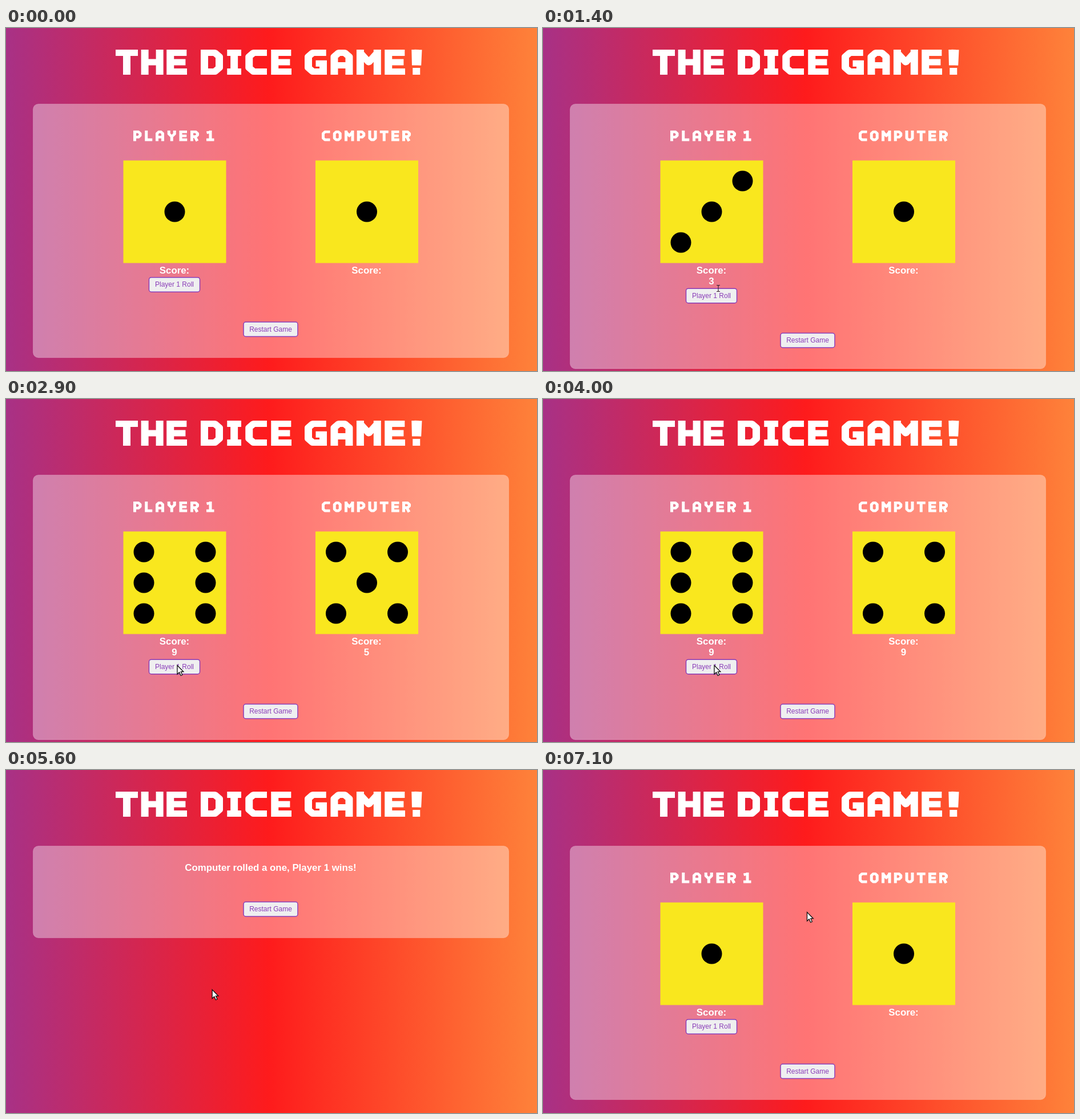
Recreate the animation shown at these times as an HTML page with a canvas. Size 930 by 602 pixels, loop 7.2 s.

```html
<!DOCTYPE html>
<html lang="en">
<head>
<meta charset="utf-8">
<title>The Dice Game</title>
<style>
  html, body { margin: 0; width: 100%; height: 100%; overflow: hidden; background: #fd1d1d; }
  canvas { display: block; }
</style>
</head>
<body>
<canvas id="stage" width="930" height="602" role="img" aria-label="The Dice Game! Player 1 against Computer"></canvas>
<script>
const ctx = document.getElementById('stage').getContext('2d');
const LOOP = 7200, STEP = 100;
const PURPLE = '#8a3db8';

// Block lettering: [width, centre lines], drawn with a pen 10 units wide on a 40 unit cap height.
const GLYPHS = {
  T: [30, 'M-5 0H25M10 0V35'],
  H: [30, 'M0-5V35M20-5V35M0 15H20'],
  E: [27.5, 'M0-5V35M0 0H22M0 15H20.5M0 30H22.5'],
  D: [30, 'M0-5V35M-5 0H14L20 6V24L14 30H-5'],
  I: [19, 'M-5 0H14M-5 30H14M4.5 0V30'],
  C: [29, 'M24 0H6L0 6V24L6 30H24'],
  G: [30, 'M24 0H6L0 6V24L6 30H20M20 35V12M10 17H25'],
  A: [30, 'M0 35V6L6 0H14L20 6V35M0 20H20'],
  M: [33, 'M0-5V35M23-5V35M0 0L11.5 15L23 0'],
  '!': [15, 'M1-5L1.5 20M5-5L4 20M2.5 24V35'],
  P: [29, 'M0-5V35M-5 0H13L19 6V14L13 20H0'],
  L: [26, 'M0-5V35M0 30H21'],
  Y: [30, 'M0-5V8L10 18L20 8V-5M10 16V35'],
  R: [30, 'M0-5V35M-5 0H14L20 6V12L14 18H0M10 17L19 35'],
  1: [27, 'M-4 3L9 0M9-5V30M-5 30H22'],
  O: [30, 'M6 0H14L20 6V24L14 30H6L0 24V6Z'],
  U: [30, 'M0-5V24L6 30H14L20 24V-5']
};
for (const g of Object.values(GLYPHS)) g[1] = new Path2D(g[1]);

// Set a word between two edges with even letter spacing.
function lettering(word, left, right, top, sx, sy) {
  const total = [...word].reduce((sum, ch) => sum + GLYPHS[ch][0] * sx, 0);
  const gap = word.length > 1 ? (right - left - total) / (word.length - 1) : 0;
  let x = left;
  ctx.strokeStyle = '#fff';
  ctx.lineWidth = 10;
  ctx.lineJoin = 'round';
  for (const ch of word) {
    const [width, path] = GLYPHS[ch];
    ctx.save();
    ctx.translate(x + 5 * sx, top + 5 * sy);
    ctx.scale(sx, sy);
    ctx.stroke(path);
    ctx.restore();
    x += width * sx + gap;
  }
}

function box(x, y, w, h, r, fill, stroke, line) {
  ctx.beginPath();
  ctx.roundRect(x, y, w, h, r);
  ctx.fillStyle = fill;
  ctx.fill();
  ctx.strokeStyle = stroke;
  ctx.lineWidth = line;
  ctx.stroke();
}

function label(text, x, y, font, color) {
  ctx.font = font + ' "Liberation Sans", Arial, sans-serif';
  ctx.textAlign = 'center';
  ctx.fillStyle = color;
  ctx.fillText(text, x, y);
}

const bold = (text, x, y) => label(text, x, y, 'bold 16.85px', '#fff');

function button(text, x, y, w) {
  box(x - w / 2, y, w, 25.5, 4, '#efeff0', PURPLE, 1.5);
  label(text, x, y + 16.7, '12px', PURPLE);
}

function die(x, y, face) {
  ctx.fillStyle = '#f9e71e';
  ctx.fillRect(x, y, 180, 180);
  const pips = [];
  if (face % 2) pips.push([0, 0]);
  if (face > 1) pips.push([1, -1], [-1, 1]);
  if (face > 3) pips.push([-1, -1], [1, 1]);
  if (face === 6) pips.push([-1, 0], [1, 0]);
  ctx.fillStyle = '#000';
  for (const [px, py] of pips) {
    ctx.beginPath();
    ctx.arc(x + 90 + px * 54, y + 90 + py * 54, 18, 0, Math.PI * 2);
    ctx.fill();
  }
}

function backdrop() {
  const g = ctx.createLinearGradient(0, 0, 930, 0);
  g.addColorStop(0, '#a83186');
  g.addColorStop(0.495, '#fe1b1c');
  g.addColorStop(1, '#fe823a');
  ctx.fillStyle = g;
  ctx.fillRect(0, 0, 930, 602);
  lettering('THE', 192, 317, 38, 1.3, 1.1);
  lettering('DICE', 341, 500, 38, 1.3, 1.1);
  lettering('GAME', 523, 699, 38, 1.3, 1.1);
  lettering('!', 709, 729, 38, 1.3, 1.1);
}

function panel(bottom) {
  box(47.5, 133.5, 833, bottom - 133.5, 9, 'rgba(255,255,255,.39)', 'rgba(255,255,255,.22)', 1);
}

// Rolls: [time, side, face, score]
const ROLLS = [[1200, 0, 3, 3], [1900, 1, 5, 5], [2500, 0, 6, 9], [3100, 1, 4, 9]];
const WIN = 4700, RESTART = 7000;

function table(t) {
  const sides = [{ x: 205.5, face: 1, score: '' }, { x: 542, face: 1, score: '' }];
  if (t < RESTART) {
    for (const [at, side, face, score] of ROLLS) {
      if (t >= at) Object.assign(sides[side], { face, score });
    }
  }
  const drop = sides[0].score ? 19.5 : 0;
  panel(578.5 + drop);
  lettering('PLAYER', 223, 338, 180, 0.5, 0.46);
  lettering('1', 351, 365, 180, 0.5, 0.46);
  lettering('COMPUTER', 553, 709, 180, 0.5, 0.46);
  for (const { x, face, score } of sides) {
    die(x, 232.5, face);
    bold('Score:', x + 89.5, 431);
    if (score) bold(score, x + 89.5, 450.3);
  }
  button('Player 1 Roll', 295, 437.7 + drop, 89);
  button('Restart Game', 463.5, 516 + drop, 95);
}

function result() {
  panel(294.5);
  bold('Computer rolled a one, Player 1 wins!', 463.5, 177);
  button('Restart Game', 463.5, 231.5, 95);
}

// Pointer stops: [time, x, y]
const STOPS = [[300, 335, 610], [1000, 307, 457], [1400, 307, 457], [1700, 300, 467.5],
               [5100, 300, 467.5], [6300, 462.5, 249.5]];
const ARROW = new Path2D('M0 0V15.5L3.6 12.2L6.2 18L8.8 16.8L6.3 11.2H10.8Z');
const BEAM = new Path2D('M-3-5.5H-1L0-4.5L1-5.5H3M0-4.5V4.5M-3 5.5H-1L0 4.5L1 5.5H3');

function pointer(t) {
  if (t < STOPS[0][0]) return;
  let i = STOPS.length - 1;
  while (STOPS[i][0] > t) i--;
  let [t0, x, y] = STOPS[i];
  if (i + 1 < STOPS.length) {
    const [t1, nx, ny] = STOPS[i + 1];
    const k = (t - t0) / (t1 - t0), e = k * k * (3 - 2 * k);
    x += (nx - x) * e;
    y += (ny - y) * e;
  }
  ctx.save();
  ctx.translate(x, y);
  if (t >= ROLLS[0][0] && t < 1700 && y < 458) {
    ctx.strokeStyle = '#3a2430';
    ctx.lineWidth = 1.1;
    ctx.stroke(BEAM);
  } else {
    ctx.fillStyle = '#fff';
    ctx.strokeStyle = '#111';
    ctx.lineWidth = 1.3;
    ctx.lineJoin = 'miter';
    ctx.fill(ARROW);
    ctx.stroke(ARROW);
  }
  ctx.restore();
}

function draw(now) {
  const t = Math.floor((now % LOOP) / STEP) * STEP;
  backdrop();
  if (t >= WIN && t < RESTART) result();
  else table(t);
  pointer(t);
}

const start = performance.now();
function tick() {
  draw(performance.now() - start);
  requestAnimationFrame(tick);
}
tick();
</script>
</body>
</html>
```
